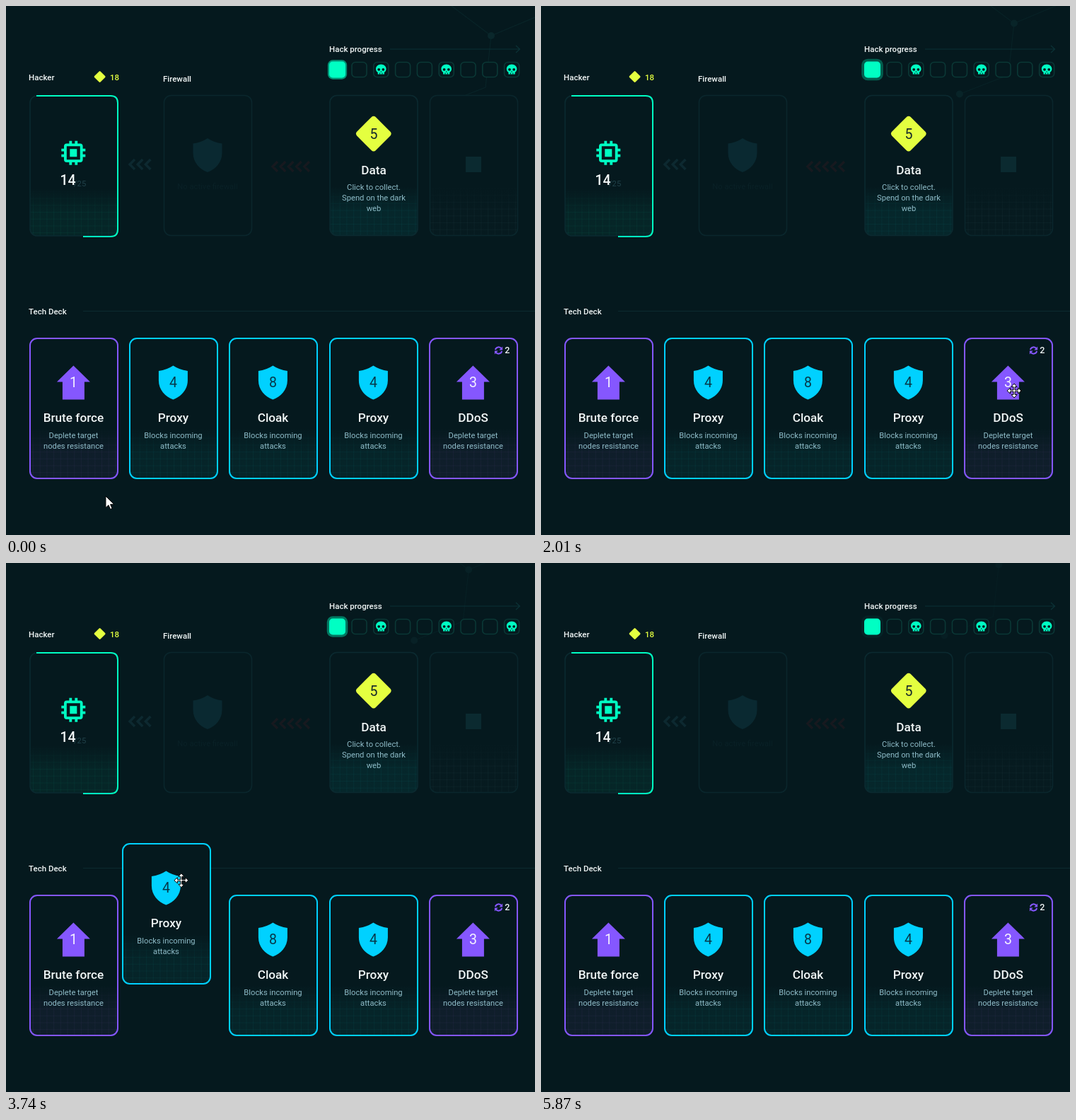
An HTML page that plays this animation: 748x748 px, repeating every 5970 ms.

```html
<!DOCTYPE html>
<html lang="en">
<head>
<meta charset="utf-8">
<title>Card game</title>
<style>
  html, body { margin: 0; width: 100%; height: 100%; overflow: hidden; background: #05191e; }
  svg { display: block; width: 100vw; height: 100vh; }
  text { font-family: Roboto, "Open Sans", sans-serif; }
  .label { font-size: 11.5px; font-weight: 500; fill: #f1f6f6; }
  .title { font-size: 17.2px; font-weight: 500; fill: #f1f6f6; text-anchor: middle; }
  .info { font-size: 11.2px; fill: #8fbcc8; text-anchor: middle; }
  .value { font-size: 19.5px; text-anchor: middle; }
</style>
</head>
<body>
<svg id="stage" viewBox="0 0 748 748">
  <defs>
    <clipPath id="inside"><rect x="1" y="1" width="124" height="198" rx="10"/></clipPath>
  </defs>
  <g id="network" fill="none" stroke="#092428" stroke-width="1.2">
    <path d="M-84 -63 L0 0 L93 -39 M0 0 L-8 73 L-77 100"/>
    <g fill="#0a272b" stroke="none"><circle r="5"/><circle cx="-77" cy="100" r="5"/></g>
  </g>
  <g id="board"></g>
  <g id="deck"></g>
  <g id="pointer" stroke="#000" stroke-width="1" stroke-linejoin="round" fill="#fff">
    <path id="arrow" d="M0 0V16.5L4 12.8L6.6 18.6L9.2 17.5L6.6 11.8H12Z"/>
    <path id="move" d="M0 -10L4 -5.5H1V-1H5.5V-4L10 0L5.5 4V1H1V5.5H4L0 10L-4 5.5H-1V1H-5.5V4L-10 0L-5.5 -4V-1H-1V-5.5H-4Z"/>
  </g>
</svg>
<script>
const LOOP = 5970;
const GREEN = '#00ffc3', CYAN = '#00d1ff', PURPLE = '#8557ff', YELLOW = '#e4ff40';
const INK = '#05191e', LINE = '#0b2a30', TEAL = '#0a8c8c';
const $ = id => document.getElementById(id);
const range = n => [...Array(n).keys()];

const text = (x, y, str, cls, attrs = '') => `<text x="${x}" y="${y}" class="${cls}" ${attrs}>${str}</text>`;
const lines = (x, y, rows) => rows.map((row, i) => text(x, y + i * 15, row, 'info')).join('');
const path = (d, attrs) => `<path d="${d}" ${attrs}/>`;
const at = (x, y, body, extra = '') => `<g transform="translate(${x} ${y}) ${extra}">${body}</g>`;

const shield = fill => path('M0 -24Q9 -18 20.5 -16.5V-3C20.5 10 11 20 0 24C-11 20 -20.5 10 -20.5 -3V-16.5Q-9 -18 0 -24Z', `fill="${fill}"`);
const upArrow = path('M0 -24L23.5 -1H15.5V24H-15.5V-1H-23.5Z', `fill="${PURPLE}"`);
const diamond = side => `<rect x="${-side / 2}" y="${-side / 2}" width="${side}" height="${side}" rx="${side * .11}" fill="${YELLOW}" transform="rotate(45)"/>`;

let fadeCount = 0;
function fade(color, from, strength) {
  const id = 'fade' + fadeCount++;
  return [id, `<linearGradient id="${id}" gradientUnits="userSpaceOnUse" x1="0" y1="${from}" x2="0" y2="200">
    <stop offset="0" stop-color="${color}" stop-opacity="0"/>
    <stop offset=".5" stop-color="${color}" stop-opacity="${strength}"/>
    <stop offset="1" stop-color="${color}" stop-opacity="${strength}"/></linearGradient>`];
}

function frame(border, tint, { from = 128, wash = .1, grid = .08, body = '', width = 2 } = {}) {
  let floor = '';
  if (tint) {
    const [washId, washDef] = fade(tint, from, wash);
    const [gridId, gridDef] = fade(tint, from, grid);
    const cells = range(13).map(i => `M${5.5 + i * 9.7} ${from}V200`).join('')
      + range(8).map(i => `M0 ${from + 4.5 + i * 9.7}H126`).join('');
    floor = `${washDef}${gridDef}<g clip-path="url(#inside)">
      <rect y="${from}" width="126" height="${200 - from}" fill="url(#${washId})"/>
      ${path(cells, `stroke="url(#${gridId})" stroke-width="1" fill="none"`)}</g>`;
  }
  return `<rect x="1" y="1" width="124" height="198" rx="10" fill="${INK}"/>${floor}
    <rect x="1" y="1" width="124" height="198" rx="10" fill="none" stroke="${border}" stroke-width="${width}"/>${body}`;
}

// Top half of the board
const chevrons = (x, y, n, color) => path(range(n).map(i => `M${x + i * 11.2} ${y}l-7 7l7 7`).join(''),
  `fill="none" stroke="${color}" stroke-width="3.4"`);

const chip = at(95.3, 207.7, `<g fill="none" stroke="${GREEN}" stroke-width="3.8">
  <rect x="-11.4" y="-11.4" width="22.8" height="22.8" rx="2"/>
  ${path('M-4 -17V-12M4 -17V-12M-4 17V12M4 17V12M-17 -4H-12M-17 4H-12M17 -4H12M17 4H12', '')}</g>
  <rect x="-5" y="-5.5" width="10" height="11" fill="${GREEN}"/>`);

const skull = path('M0 -7C4.5 -7 7.3 -4 7.3 -.4C7.3 2 6 3.4 4.6 4.2V7H-4.6V4.2C-6 3.4 -7.3 2 -7.3 -.4C-7.3 -4 -4.5 -7 0 -7Z', `fill="${GREEN}"`)
  + `<g fill="${INK}"><circle cx="-3.1" cy=".3" r="1.9"/><circle cx="3.1" cy=".3" r="1.9"/></g>`
  + path('M0 2.6V4.2M-1.7 5V7M1.7 5V7', `stroke="${INK}" stroke-width="1"`);

const slots = range(9).map(i => {
  const x = 457.5 + i * 30.8;
  if (!i) return `<rect id="ring" fill="${GREEN}"/><rect x="457" y="78.5" width="23" height="23" rx="5" fill="${GREEN}"/>`;
  return `<rect x="${x + .7}" y="79.5" width="21" height="21" rx="5" fill="${INK}" stroke="#0b3836" stroke-width="1.6"/>`
    + (i % 3 === 2 ? at(x + 11.2, 89.5, skull) : '');
}).join('');

$('board').innerHTML =
  text(32, 105, 'Hacker', 'label') + text(222, 107, 'Firewall', 'label')
  + text(457, 65, 'Hack progress', 'label') + text(32, 436, 'Tech Deck', 'label')
  + at(132.6, 100, diamond(12)) + text(147, 105, '18', 'label', `style="fill:${YELLOW}"`)
  + path('M543 61H726M721 56L726.5 61L721 66', `fill="none" stroke="#0b3236" stroke-width="1.2"`)
  + path('M109 431.5H748', 'stroke="#0c2a2f" stroke-width="1"')
  + slots
  + at(33, 126, frame(LINE, '#0a9678', { wash: .1, from: 132, width: 1.6 }))
  + path('M43 127H148Q158 127 158 137V316Q158 326 148 326H109', `fill="none" stroke="${GREEN}" stroke-width="2"`)
  + chip
  + text(76.5, 253, '14', 'value', 'style="text-anchor:start;font-weight:500;fill:#f1f6f6"')
  + text(96, 255, '/25', 'info', 'style="text-anchor:start;fill:#21424a"')
  + chevrons(182, 217, 3, '#0d2930') + chevrons(384, 220, 5, '#17191f')
  + at(222.5, 125.5, frame('#0a262c', '', { width: 1.6 })) + at(285, 211, shield('#0a2931'))
  + text(285, 259, 'No active firewall', 'info', 'style="fill:#0a2127"')
  + at(457, 125.5, frame(LINE, TEAL, { wash: .12, from: 130, width: 1.6 }))
  + at(519.8, 180.6, diamond(37.6)) + text(520, 187.5, '5', 'value', 'fill="#14292b"')
  + text(520, 238, 'Data', 'title') + lines(520, 260, ['Click to collect.', 'Spend on the dark', 'web'])
  + at(598.5, 125.5, frame('#0a262c', '#3a6068', { wash: .02, grid: .09, width: 1.6 }))
  + '<rect x="650" y="213" width="22" height="22" fill="#0b2a30"/>';

// Deck cards
const refresh = at(98.5, 18, path('M-4.6 -1A4.7 4.7 0 0 1 4 -2.4M4.6 1A4.7 4.7 0 0 1 -4 2.4', `fill="none" stroke="${PURPLE}" stroke-width="2"`)
  + path('M5.6 -5.6V-.6H.8ZM-5.6 5.6V.6H-.8Z', `fill="${PURPLE}"`))
  + text(107.3, 22.3, '2', 'label', 'style="font-size:12.5px"');

function deckCard(name, value, attack, extra = '') {
  const color = attack ? PURPLE : CYAN;
  const info = attack ? ['Deplete target', 'nodes resistance'] : ['Blocks incoming', 'attacks'];
  const body = at(62.4, 63.4, attack ? upArrow : shield(CYAN))
    + text(62.5, 70, value, 'value', `fill="${attack ? '#f4f1ff' : '#06384a'}"`)
    + text(62.5, 119, name, 'title') + lines(62.5, 142, info) + extra;
  return frame(color, attack ? '#6a4a9c' : TEAL, { body });
}

const homeX = i => Math.round(33 + i * 141.2), HOME_Y = 469;
const cards = [
  ['Brute force', 1, true], ['Proxy', 4], ['Cloak', 8], ['Proxy', 4], ['DDoS', 3, true, refresh]
].map((spec, i) => {
  const g = document.createElementNS('http://www.w3.org/2000/svg', 'g');
  g.innerHTML = deckCard(...spec);
  $('deck').append(g);
  return g;
});

// Pointer route as [ms, x, y]
const route = [
  [0, 141, 693], [150, 136, 689], [400, 88, 630], [600, 62, 582], [800, 76, 560], [1000, 140, 545],
  [1190, 243, 535], [1310, 334, 532], [1500, 470, 534], [1800, 651, 540], [2010, 669, 544],
  [2060, 668, 543], [2200, 655, 490], [2330, 636, 502], [2410, 616, 528], [2540, 553, 532],
  [2690, 550, 491], [2850, 518, 480], [3020, 415, 530], [3070, 400, 533], [3220, 392, 480],
  [3350, 368, 482], [3500, 264, 520], [3560, 258, 522], [3740, 248, 449], [3870, 213, 450],
  [4040, 120, 525], [4080, 113, 526], [4220, 125, 460], [4340, 148, 432], [4460, 158, 425],
  [4600, 190, 428], [4860, 360, 482], [5150, 570, 590], [5400, 712, 702], [5520, 736, 760]
];
const drags = [
  { card: 4, grab: 2060, drop: 2330 }, { card: 3, grab: 2540, drop: 2850 }, { card: 2, grab: 3070, drop: 3350 },
  { card: 1, grab: 3560, drop: 3870 }, { card: 0, grab: 4080, drop: 4340 }
];
const RETURN = 110;

// Cubic Hermite through the route points
function pointerAt(t) {
  const last = route.length - 1;
  if (t >= route[last][0]) return route[last].slice(1);
  const i = route.findIndex((p, k) => k < last && t < route[k + 1][0]);
  const a = route[i], b = route[i + 1], span = b[0] - a[0], u = (t - a[0]) / span;
  const slope = (k, axis) => {
    const p = route[Math.max(0, k - 1)], n = route[Math.min(last, k + 1)];
    return (n[axis] - p[axis]) / (n[0] - p[0]) * span;
  };
  return [1, 2].map(axis =>
    (1 + 2 * u) * (1 - u) ** 2 * a[axis] + u * (1 - u) ** 2 * slope(i, axis)
    + u * u * (3 - 2 * u) * b[axis] + u * u * (u - 1) * slope(i + 1, axis));
}

function drawCards(t) {
  const offsets = cards.map(() => [0, 0]);
  for (const { card, grab, drop } of drags) {
    if (t < grab || t > drop + RETURN) continue;
    const from = pointerAt(grab), to = pointerAt(Math.min(t, drop));
    const left = t > drop ? (1 - (t - drop) / RETURN) ** 2 : 1;
    offsets[card] = [0, 1].map(k => (to[k] - from[k]) * left);
    if ($('deck').lastChild !== cards[card]) $('deck').append(cards[card]);
  }
  cards.forEach((g, i) => g.setAttribute('transform',
    `translate(${Math.round(homeX(i) + offsets[i][0])} ${Math.round(HOME_Y + offsets[i][1])})`));
}

function drawPointer(t) {
  const [x, y] = pointerAt(t);
  const held = drags.some(d => t >= d.grab && t <= d.drop);
  const over = held || cards.some((_, i) =>
    x > homeX(i) && x < homeX(i) + 126 && y > HOME_Y && y < HOME_Y + 200);
  $('pointer').setAttribute('transform', `translate(${x} ${y})`);
  $('move').style.display = over ? '' : 'none';
  $('arrow').style.display = over ? 'none' : '';
}

function drawRing(t) {
  const u = (t / 910 + .11) % 1;
  const spread = 4.2 * (1 - (1 - u) ** 6);
  const box = { x: 457 - spread, y: 78.5 - spread, width: 23 + 2 * spread, height: 23 + 2 * spread, rx: 5 + spread };
  for (const key in box) $('ring').setAttribute(key, box[key]);
  $('ring').setAttribute('opacity', Math.max(0, .65 * (1 - u / .6)));
}

function drawNetwork(t) {
  const drift = Math.min(t, 4550) * .0085;
  $('network').setAttribute('transform', `translate(${686 - drift} ${42 - drift * 1.02})`);
  $('network').setAttribute('opacity', 1 - .6 * t / LOOP);
}

function render(t) {
  drawCards(t);
  drawPointer(t);
  drawRing(Math.min(t, 5870));
  drawNetwork(t);
}

const start = performance.now();
function tick() {
  render((performance.now() - start) % LOOP);
  requestAnimationFrame(tick);
}
tick();
</script>
</body>
</html>
```
